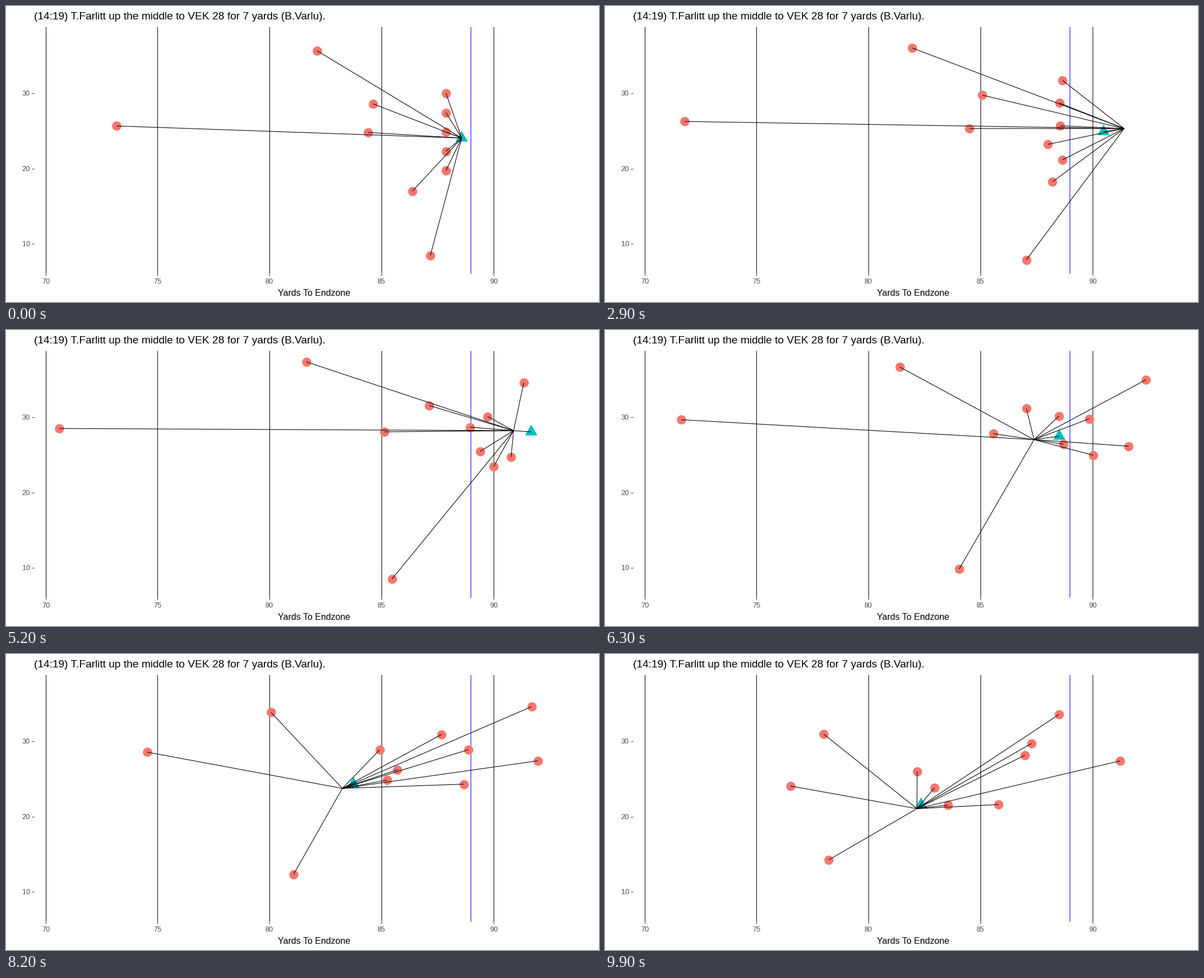
Recreate the animation shown at these times as a matplotlib script. Size 1058x529 px, loop 10 s.

```python
import numpy as np
import matplotlib.pyplot as plt
from matplotlib.animation import FuncAnimation
from matplotlib.collections import LineCollection
from matplotlib.patches import Polygon

W, H, DPI = 1058, 529, 100
FRAMES, INTERVAL = 100, 100
PT = 72 / DPI  # points per pixel
RED, TEAL = "#F8766D", "#00BFC4"
GREY, TICK = "#4D4D4D", "#333333"

# Moments of the play, in frames
SNAP, HANDOFF, BURST, TURN, CHASE, END = 12, 22, 39, 52, 74, 99
LEAD = 3.5  # frames the runner is projected ahead


def spline(keys, points, drift=(0, 0)):
    """Smooth path on every frame; steady drift until the first key."""
    t, p = np.array(keys, float), np.array(points, float)
    h, n = np.diff(t)[:, None], len(t)
    slope = np.diff(p, axis=0) / h
    A, b = np.zeros((n, n)), np.zeros((n, 2))
    A[0, 0], b[0] = 1, drift
    for i in range(1, n - 1):
        before, after = h[i - 1, 0], h[i, 0]
        A[i, i - 1:i + 2] = after, 2 * (before + after), before
        b[i] = 3 * (after * slope[i - 1] + before * slope[i])
    A[-1, -2:], b[-1] = (1, 2), 3 * slope[-1]
    m = np.linalg.solve(A, b)

    f = np.arange(FRAMES)
    k = np.clip(np.searchsorted(t, f, side="right") - 1, 0, n - 2)
    d = h[k]
    u = (f[:, None] - t[k, None]) / d
    curve = ((1 + 2 * u) * (1 - u) ** 2 * p[k] + u * (1 - u) ** 2 * d * m[k]
             + u ** 2 * (3 - 2 * u) * p[k + 1] + u ** 2 * (u - 1) * d * m[k + 1])
    waiting = p[0] + np.outer(f - t[0], drift)
    return np.where(f[:, None] < t[0], waiting, curve)


def defend(start, burst, chase, end, turn=None, drift=(0, 0)):
    """Defender's path; `turn` only for those who change direction sharply."""
    if turn is None:
        return spline((SNAP, BURST, CHASE, END), (start, burst, chase, end), drift)
    return spline((SNAP, BURST, TURN, CHASE, END),
                  (start, burst, turn, chase, end), drift)


# The five linemen start evenly spaced
line = [(785, 156 + 34.5 * i) for i in range(5)]

defenders = np.stack([
    defend((178, 212), (115, 197), (206, 160), (331, 236), turn=(95, 176),
           drift=(-1.6, -0.2)),
    defend((555, 80), (542, 67), (502, 87), (390, 143), turn=(536, 57)),
    defend((757, 446), (735, 456), (565, 407), (399, 368)),
    defend((655, 175), (705, 145), (710, 156), (557, 210), turn=(755, 135)),
    defend((646, 226), (658, 205), (696, 206), (612, 270), turn=(675, 182)),
    defend((725, 331), (852, 288), (852, 223), (702, 269), turn=(870, 244)),
    defend(line[0], (858, 112), (969, 90), (810, 108)),
    defend(line[1], (836, 160), (849, 166), (749, 181)),
    defend(line[2], (830, 199), (789, 143), (761, 160)),
    defend(line[3], (810, 234), (751, 200), (588, 239), turn=(846, 217)),
    defend(line[4], (852, 254), (951, 195), (919, 191)),
])
runner = spline((SNAP, HANDOFF, BURST, TURN, CHASE, END),
                ((813, 236), (829, 233), (977, 205), (937, 182), (680, 214), (564, 269)))
heading = runner + LEAD * np.gradient(runner, axis=0)

fig = plt.figure(figsize=(W / DPI, H / DPI), dpi=DPI, facecolor="white")
ax = fig.add_axes([0, 0, 1, 1])
ax.set_xlim(0, W)
ax.set_ylim(H, 0)
ax.axis("off")


def rule(x0, y0, x1, y1, color):
    ax.plot([x0, x1], [y0, y1], color=color, lw=PT, solid_capstyle="butt", zorder=1)


def label(x, y, text, px, color="black", ha="center"):
    ax.text(x, y, text, fontsize=px * PT, color=color, ha=ha, va="baseline",
            family="Liberation Sans")


for i in range(5):
    x = int(70.2 + 199.7 * i) + 0.5
    rule(x, 37, x, 478, "black")
    rule(x, 478, x, 482, TICK)
    label(x + 0.5, 496.5, str(70 + 5 * i), 12.8, GREY)
rule(828.5, 37, 828.5, 478, "blue")

for i in range(3):
    y = int(424.3 - 134.3 * i) + 0.5
    rule(46, y, 50, y, TICK)
    label(43, y + 4.5, str(10 + 10 * i), 12.8, GREY, ha="right")

label(50.5, 24, "(14:19) T.Farlitt up the middle to VEK 28 for 7 yards (B.Varlu).",
      19.2, ha="left")
label(550, 517.5, "Yards To Endzone", 16)

dots, = ax.plot([], [], "o", color=RED, ms=16.5 * PT, mew=0, snap=False, zorder=2)
TRIANGLE = 12.8 * np.array([(0, -1), (0.866, 0.5), (-0.866, 0.5)])
arrow = ax.add_patch(Polygon(TRIANGLE, closed=True, fc=TEAL, lw=0, zorder=3))
lines = ax.add_collection(LineCollection([], colors="black", linewidths=1.07 * PT,
                                         zorder=4))


def draw(i):
    spots, ball, target = defenders[:, i], runner[i], heading[i]
    dots.set_data(spots[:, 0], spots[:, 1])
    arrow.set_xy(ball + TRIANGLE)
    lines.set_segments([(p, target) for p in (*spots, ball)])
    return dots, arrow, lines


anim = FuncAnimation(fig, draw, frames=FRAMES, interval=INTERVAL,
                     repeat=True, repeat_delay=0)
plt.show()
```
